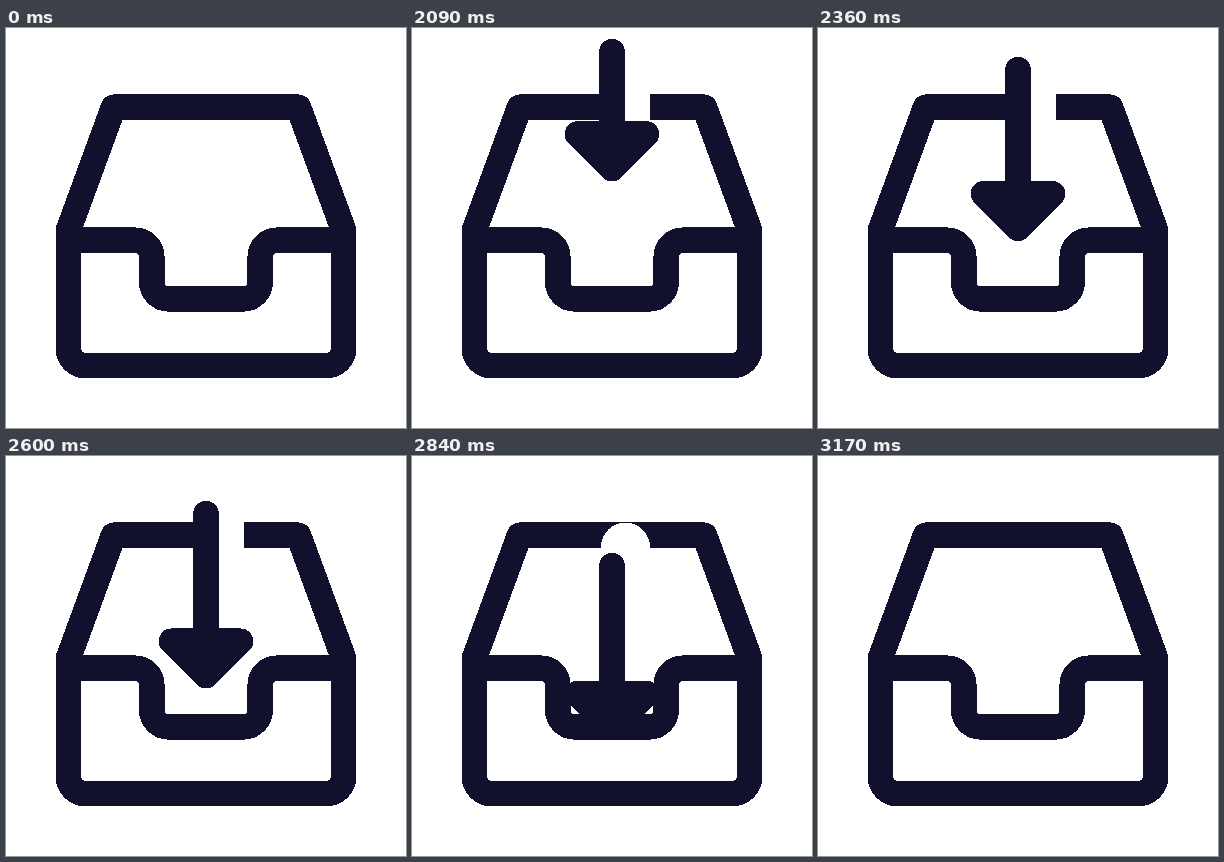
An HTML page that plays this animation: 400 px wide and 400 px high, repeating every 3.23 s.

```html
<!DOCTYPE html>
<html lang="en">
<head>
<meta charset="utf-8">
<title>Inbox</title>
<style>
  html, body { margin: 0; width: 100%; height: 100%; overflow: hidden; background: #fff; }
  svg { display: block; width: 100%; height: 100%; shape-rendering: crispEdges; }
  .ink { stroke: #11112e; stroke-width: 25.6; stroke-linecap: round; stroke-linejoin: round; fill: none; }
  #head { fill: #11112e; }
  #gap { stroke: #fff; stroke-width: 49; stroke-linecap: round; }
</style>
</head>
<body>
<svg viewBox="0 0 400 400">
  <clipPath id="slot"><rect width="400" height="270"/></clipPath>
  <path class="ink" d="M62.5 202L107.5 79.2H292.5L337.5 202"/>
  <g id="arrow" clip-path="url(#slot)">
    <line id="gap" x1="213.5" x2="213.5" y2="260"/>
    <line id="shaft" class="ink" x1="200" x2="200"/>
    <path id="head" class="ink" d="M165.5 0H234.5L200 34.5Z"/>
  </g>
  <path class="ink" d="M62.5 212.2H129.1a16.7 16.7 0 0 1 16.7 16.7V254.1a16.7 16.7 0 0 0 16.7 16.7H237.5a16.7 16.7 0 0 0 16.7-16.7V228.9a16.7 16.7 0 0 1 16.7-16.7H337.5"/>
  <path class="ink" d="M62.5 202V320.8a16.7 16.7 0 0 0 16.7 16.7H320.8a16.7 16.7 0 0 0 16.7-16.7V202"/>
</svg>
<script>
  const LOOP = 3230, ENTER = 2030, DROP = 2540, GONE = 3020, STEP = 30;
  const [arrow, gap, shaft, head] = ['arrow', 'gap', 'shaft', 'head'].map(id => document.getElementById(id));

  function draw(time) {
    const visible = time >= ENTER && time < GONE;
    arrow.style.display = visible ? '' : 'none';
    if (!visible) return;

    const age = Math.floor((time - ENTER) / STEP) * STEP;
    const fall = Math.max(0, age + ENTER - DROP) / 300;
    // Slow drift, then an accelerating drop into the tray
    const top = 19.6 + age / 15 + 36 * fall ** 4;
    // The shaft grows quickly and settles
    const length = 128 - 79 * Math.exp(-age / 109);

    gap.setAttribute('y1', top - 18.5);
    shaft.setAttribute('y1', top);
    shaft.setAttribute('y2', top + length);
    head.setAttribute('transform', `translate(0 ${top + length})`);
  }

  const start = performance.now();
  function tick() {
    draw((performance.now() - start) % LOOP);
    requestAnimationFrame(tick);
  }
  draw(0);
  requestAnimationFrame(tick);
</script>
</body>
</html>
```
